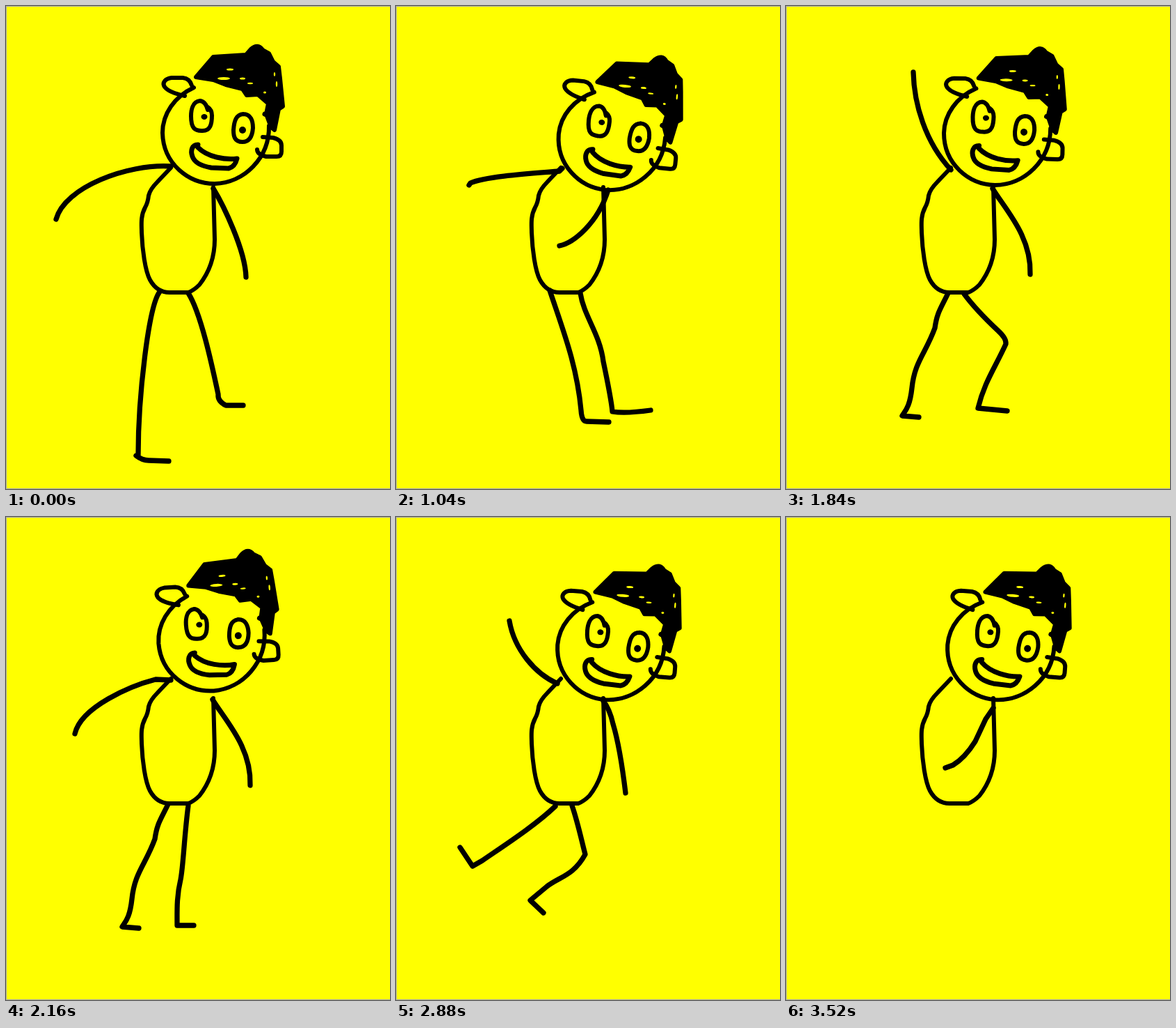
These frames come from a looping animation (552x693 px, 3600 ms). An HTML page with a canvas:

```html
<!DOCTYPE html>
<html lang="en">
<head>
<meta charset="utf-8">
<title>Dancing doodle</title>
<style>
html, body { margin: 0; width: 100%; height: 100%; overflow: hidden; background: #ff0; }
canvas { display: block; }
</style>
</head>
<body>
<canvas id="stage" width="552" height="693"></canvas>
<script>
const ctx = document.getElementById('stage').getContext('2d');
const LOOP = 3600, STEP = 80;

// Each track lists [start time, pose]; a pose holds until the next one.
const tracks = {
  head: [[0, 0], [640, .098], [1280, .022], [2160, -.062], [2800, .08]],
  leftArm: [
    [0, 'M237 230C175 226 84 260 72 306'],
    [480, 'M147 83C152 130 190 210 233 234'],
    [880, 'M239 233L235 237C200 240 130 244 107 254L105 257'],
    [1520, 'M183 95C184 140 200 195 237 235'],
    [2000, 'M237 234L215 233C180 242 108 272 99 311'],
    [2480, 'M163 149C170 190 200 225 232 239'],
    [2960, 'M130 167C150 205 190 230 236 236'],
    [3520, '']
  ],
  rightArm: [
    [0, 'M298 262C312 285 344 350 345 389'],
    [480, 'M299 257C312 275 322 285 338 285L367 285Q385 281 420 266'],
    [1040, 'M305 264C290 312 255 340 235 344'],
    [1680, 'M297 262C315 292 353 330 351 385'],
    [2240, 'M298 262C320 290 350 292 428 268'],
    [2800, 'M298 264Q307 275 312 297Q322 330 330 396'],
    [3040, 'M298 262C315 285 350 300 421 280'],
    [3440, 'M298 274L287 290L272 322C262 338 250 350 240 356L229 360']
  ],
  leftLeg: [
    [0, 'M221 410C205 430 190 560 190 645M187 645Q196 652 205 652L234 653'],
    [320, 'M226 413C200 432 172 462 162 488C188 535 186 575 196 612C188 620 180 622 165 622'],
    [800, 'M221 408C240 465 260 515 266 580Q267 596 274 596L306 597'],
    [1280, 'M229 416C195 434 160 448 131 454C118 430 119 412 114 396Q108 390 98 394L75 406'],
    [1840, 'M233 412C222 435 217 440 214 462C200 500 185 510 181 548C178 575 172 580 167 588L191 590'],
    [2320, 'M228 412C224 450 198 500 190 545L184 583L208 584'],
    [2880, 'M229 415C200 443 150 475 124 493L110 501L92 474'],
    [3280, 'M226 412C225 480 215 530 205 596L240 596'],
    [3520, '']
  ],
  rightLeg: [
    [0, 'M262 412C280 440 296 515 305 557Q304 567 316 573L341 573'],
    [480, 'M268 413C255 445 240 462 237 480C229 520 218 545 211 560C212 573 226 583 235 594Q215 612 199 618'],
    [960, 'M265 412C270 445 293 470 298 510C306 548 310 570 311 582Q330 585 366 580'],
    [1520, 'M256 413C270 432 290 452 305 466Q317 477 316 485C300 520 285 540 276 577L318 581'],
    [2000, 'M262 414C256 460 255 500 251 520C245 545 246 565 246 586L270 586'],
    [2560, 'M253 414C262 440 268 470 272 484C255 515 235 516 217 530L193 550L212 568'],
    [2960, 'M262 413C275 470 290 510 295 583L330 584'],
    [3520, '']
  ]
};

const torso = 'M237 232L218 252Q207 263 205 272Q204 282 200 289C193 302 195 315 195 325' +
  'C196 350 200 380 207 393Q217 411 235 411L262 411Q270 408 278 400Q300 372 300 335L298 260';
const face = 'M270 117C242 130 225 155 225 182C226 226 262 255 300 255C342 254 379 218 378 172';
const ears = 'M267 114Q264 104 254 103L238 103C229 104 224 110 228 116Q234 124 257 129' +
  'M369 188L384 189Q396 192 396 200L396 209Q396 216 389 216L374 216Q361 213 361 206';
const eyes = 'M290 149Q287 137 279 136C268 137 266 150 266 158C266 176 272 179 281 179' +
  'C294 180 296 169 296 157Q296 149 290 145' +
  'M341 155C352 155 355 165 355 175C354 188 349 195 340 195C328 195 327 186 327 178C328 164 331 156 341 155';
const mouth = 'M276 199C267 199 265 208 268 216Q272 228 295 232L320 233Q329 231 332 219' +
  'C315 221 290 217 276 203';
const hair = 'M273 102L298 73L345 70L352 62Q362 53 369 63L378 68L384 80L392 87L394 104' +
  'L398 144L392 148L386 178L381 174L374 155L377 140L362 127L346 128L340 119L316 113L298 106Z';
// x, y, length, thickness
const hairGaps = [
  [322, 91, 5, 1.5], [313, 104, 9, 2], [340, 104, 4, 1.5], [351, 111, 4, 1.2],
  [372, 124, 2, 1.5], [389, 112, 1.2, 4], [386, 98, 1.2, 3]
];

function stroke(d, width) {
  ctx.lineWidth = width;
  ctx.stroke(new Path2D(d));
}

function oval(x, y, rx, ry, color) {
  ctx.fillStyle = color;
  ctx.beginPath();
  ctx.ellipse(x, y, rx, ry, 0, 0, Math.PI * 2);
  ctx.fill();
}

function poseAt(track, t) {
  let pose;
  for (const [start, value] of track) if (start <= t) pose = value;
  return pose;
}

function drawHead(angle) {
  ctx.save();
  ctx.translate(210, 273);
  ctx.rotate(angle);
  ctx.translate(-210, -273);
  stroke(face, 6);
  stroke(ears, 6);
  stroke(eyes, 6);
  stroke(mouth, 7);
  oval(285, 159, 4.5, 4, '#000');
  oval(340, 178, 5, 5, '#000');
  ctx.fill(new Path2D(hair));
  stroke(hair, 6);
  stroke('M372 155L377 157', 7);
  for (const gap of hairGaps) oval(...gap, '#ff0');
  ctx.restore();
}

function draw(t) {
  ctx.fillStyle = '#ff0';
  ctx.fillRect(0, 0, 552, 693);
  ctx.fillStyle = '#aaa';
  ctx.fillRect(0, 0, 552, 1);
  ctx.fillRect(0, 0, 1, 693);
  ctx.fillRect(0, 692, 552, 1);
  ctx.strokeStyle = '#000';
  ctx.lineCap = ctx.lineJoin = 'round';
  stroke(torso, 6);
  for (const limb of ['leftLeg', 'rightLeg', 'leftArm', 'rightArm']) {
    stroke(poseAt(tracks[limb], t), 7.3);
  }
  drawHead(poseAt(tracks.head, t));
}

function tick() {
  const t = performance.now() % LOOP;
  draw(Math.floor(t / STEP) * STEP);
  requestAnimationFrame(tick);
}
tick();
</script>
</body>
</html>
```
